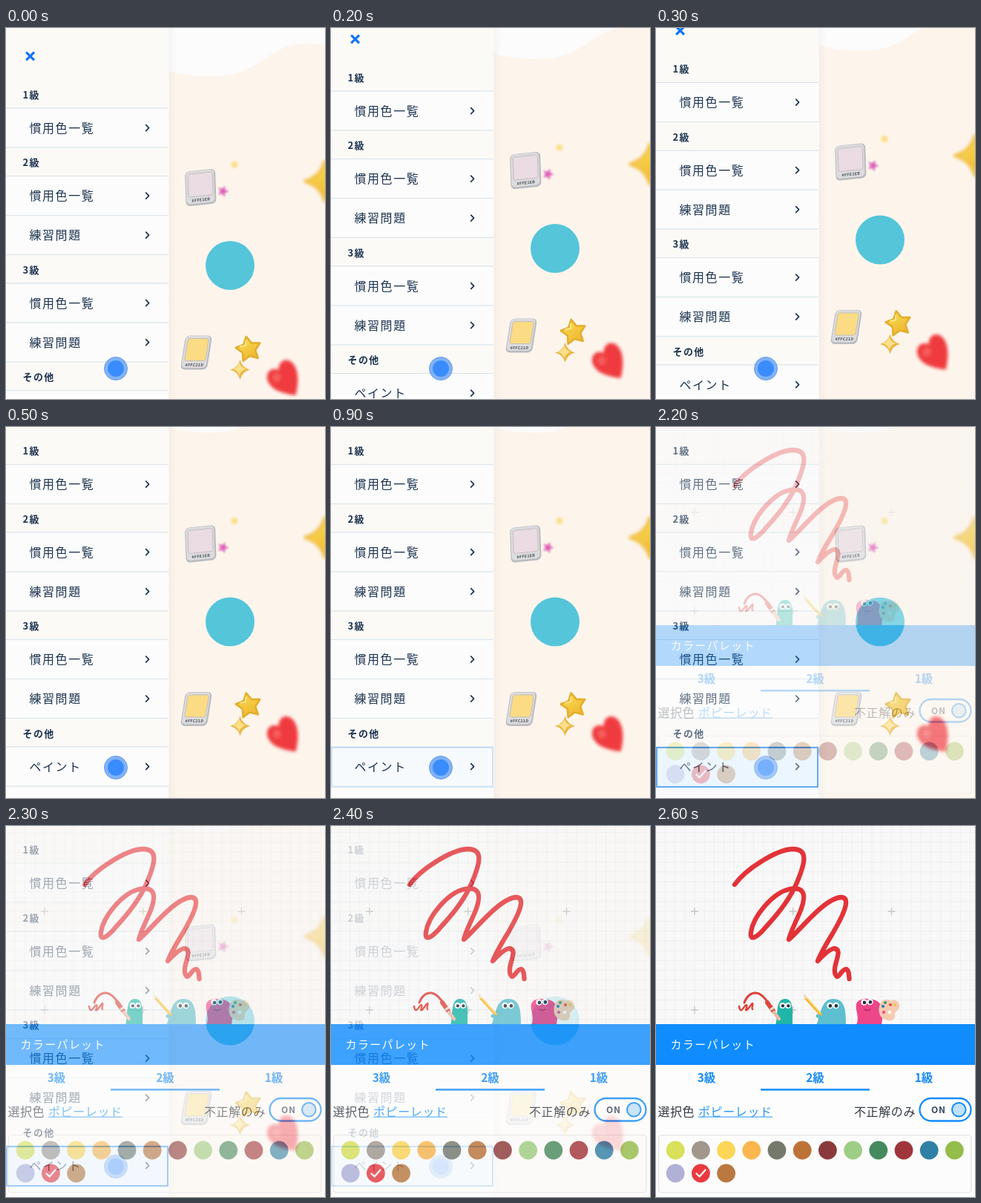
Animation of 430 by 500 pixels, one loop 5600 ms. Source, as an HTML page:

```html
<!DOCTYPE html>
<html lang="ja">
<head>
<meta charset="utf-8">
<title>カラーパレット</title>
<style>
html, body { margin: 0; width: 100%; height: 100%; overflow: hidden; background: #fdf5ec; }
svg { display: block; width: 430px; height: 500px; }
text { font-family: "Noto Sans CJK JP", "Noto Sans CJK", "Noto Sans", sans-serif; }
</style>
</head>
<body>
<svg id="stage" viewBox="0 0 430 500" xmlns="http://www.w3.org/2000/svg"></svg>
<script>
const LOOP = 5600, SCROLL = 57.5;
const NAVY = '#1d3450', BLUE = '#108cff', RED = '#e23338';
const stage = document.getElementById('stage');

const rect = (x, y, w, h, fill, more = '') =>
  `<rect x="${x}" y="${y}" width="${w}" height="${h}" fill="${fill}" ${more}/>`;
const circle = (x, y, r, fill, more = '') =>
  `<circle cx="${x}" cy="${y}" r="${r}" fill="${fill}" ${more}/>`;
const fillPath = (d, fill, more = '') => `<path d="${d}" fill="${fill}" ${more}/>`;
const line = (d, color, width, more = '') =>
  `<path d="${d}" fill="none" stroke="${color}" stroke-width="${width}" stroke-linecap="round" stroke-linejoin="round" ${more}/>`;
// y is the vertical middle of the glyphs
const label = (str, x, y, size, color, weight = 400, gap = 0, more = '') =>
  `<text x="${x}" y="${y + size * 0.38}" font-size="${size}" fill="${color}" font-weight="${weight}" letter-spacing="${gap}" ${more}>${str}</text>`;

const blur = n => `style="filter:blur(${n}px)"`;

function sparkle(x, y, r, fill, more = '') {
  const k = r * 0.2;
  return fillPath(`M0 ${-r}Q${k} ${-k} ${r} 0Q${k} ${k} 0 ${r}Q${-k} ${k} ${-r} 0Q${-k} ${-k} 0 ${-r}Z`,
    fill, `transform="translate(${x} ${y})" ${more}`);
}

function star(x, y, r, turn) {
  let pts = '';
  for (let i = 0; i < 10; i++) {
    const a = (turn + i * 36) * Math.PI / 180, d = i % 2 ? r * 0.53 : r;
    pts += `${x + d * Math.sin(a)},${y - d * Math.cos(a)} `;
  }
  return `<polygon points="${pts}" fill="url(#gold)" stroke="#e2ae2c" stroke-width="2.5" stroke-linejoin="round"/>`;
}

function chip(x, y, w, h, tilt, color, code) {
  const l = -w / 2, t = -h / 2;
  return `<g transform="translate(${x} ${y}) ${tilt}">` +
    rect(l, t, w, h, '#b9bbbf', 'rx="6"') +
    rect(l + 1, t + 0.5, w - 3, h - 3, '#dcdcde', 'rx="5"') +
    rect(l + 4, t + 4, w - 8, h - 16, color, 'rx="2.5" stroke="#bdb9b8" stroke-width=".8"') +
    label(code, 0, -t - 7, 5.3, '#4a4f58', 700, 0.3, 'text-anchor="middle"') + '</g>';
}

function page() {
  return fillPath('M200 52C225 60 248 65 275 65C320 65 336 49 360 34C380 22 402 17 430 23V-5H200Z', '#fcfcfc') +
    chip(262.3, 215, 41, 47, 'skewY(-6) skewX(2)', '#eadce2', '#FFE1EB') +
    chip(256.5, 437.5, 36, 46, 'skewX(-9)', '#fbdb84', '#FFC21D') +
    circle(308, 184, 4.5, '#fae08a', blur(1.6)) +
    `<g ${blur(1.3)}>${star(292.5, 220, 6, 20).replace(/fill=.*\/>/, 'fill="#e05ab5" stroke="#e58cc8" stroke-width="2"/>')}</g>` +
    sparkle(430, 206.5, 28, 'url(#gold)', `stroke="#f2c04a" stroke-width="4" ${blur(2)}`) +
    circle(302, 320, 33, '#55c5da') +
    star(327, 433, 17.5, -11) +
    line('M323 422L323 428L316 429', '#fff0a0', 2, 'opacity=".7"') +
    sparkle(315.5, 460.5, 13.5, '#ebb644') +
    sparkle(314.5, 459.5, 9, '#fbe08a') +
    `<g ${blur(2)}><g transform="translate(375.5 472.5) rotate(-34)">` +
    fillPath('M0 27C-14 15 -22 5-21-8C-19-21-6-24 0-14C6-25 20-23 21-9C21 4 12 16 0 27Z', '#ef3b3f') +
    circle(-8, -7, 6, '#fb7a74', 'opacity=".55"') + '</g></g>';
}

function menu() {
  const sections = [
    ['1級', ['慣用色一覧']],
    ['2級', ['慣用色一覧', '練習問題']],
    ['3級', ['慣用色一覧', '練習問題']],
    ['その他', ['ペイント']]
  ];
  const head = 38.5, row = 53;
  const rule = y => rect(0, y - 0.6, 219, 1.2, '#dbe5ec');
  let y = 69.5;
  let out = rect(0, -10, 219.5, 620, '#fcfcfc') + rect(0, -10, 219.5, 118, '#fcfaf7') +
    rect(219.5, -10, 11, 620, 'url(#shade)') +
    line('M27.2 32.6L38 43.4M38 32.6L27.2 43.4', '#1273f8', 3.2, 'style="stroke-linecap:butt"');
  for (const [title, items] of sections) {
    out += rect(0, y, 219.5, head, '#fcfaf7');
    if (y > 70) out += rule(y);
    out += label(title, 22.6, y + head / 2 + 1.2, 13, NAVY, 700, 1.3);
    y += head;
    for (const item of items) {
      out += rule(y);
      if (item === 'ペイント')
        out += `<g id="pick">${rect(1, y + 1, 217, 53, '#e6f4ff', 'stroke="#1f86f0" stroke-width="2"')}</g>`;
      out += label(item, 31.5, y + row / 2 + 0.4, 16, NAVY, 400, 1.55) +
        line(`M188.7 ${y + 22.7}L192.6 ${y + 26.7}L188.7 ${y + 30.7}`, NAVY, 1.7);
      y += row;
    }
  }
  return out + `<g id="lastRule">${rule(y)}</g>`;
}

function grid() {
  const cell = 13.27;
  let d = '', marks = '';
  for (let x = 52 - 3 * cell; x < 430; x += cell) d += `M${x} 0V267`;
  for (let y = 115 - 8 * cell; y < 267; y += cell) d += `M0 ${y}H430`;
  for (const x of [52, 184.7, 317.5])
    for (const y of [115, 247.8]) marks += `M${x - 4.5} ${y}h9M${x} ${y - 4.5}v9`;
  return rect(0, 0, 430, 268, '#f8f8f8') + line(d, '#efefef', 1) + line(marks, '#c6c6c6', 1.4);
}

const eye = (x, y, r) => circle(x, y, r, '#fff') + circle(x + 0.4, y + 0.4, r * 0.55, '#22303c');

function painters() {
  const green = fillPath('M161 268C165 258 160 233 174 233C186 233 184 250 184 268Z', '#1fb5a8') +
    eye(170.5, 242, 3.9) + eye(178, 242, 3.9) +
    line('M112 243C113 249 115 250 118 245C122 239 124 240 121 248C123 250 127 241 130 239C132 240 128 244 130 247', '#dc4038', 2.4) +
    line('M119 238C122 230 128 224 135 225C143 226 147 233 153 240', '#dc4038', 3) +
    line('M150 238L158 249', '#d9483e', 6) + line('M155 247L158 245', '#f3e0d5', 3) +
    line('M159 251L166 260', '#e8b9a4', 4.5);
  const blue = fillPath('M216 268C222 258 221 233 239 233C255 233 256 249 256 268Z', '#5dbfd0') +
    eye(234.5, 242, 4.2) + eye(242.5, 242, 4.2) +
    line('M202 232L222 254', '#f2b72f', 4) + line('M203 231.5L222 252.5', '#fbdc75', 1.3) +
    line('M200 228.5L202 231', '#f0dfc0', 3) + line('M218 256L224 259', '#5dbfd0', 5);
  const pink = fillPath('M270 268C275 259 268 247 270 240C272 232 286 231 296 235C308 240 306 256 304 268Z', '#ed4689') +
    eye(280.5, 237.5, 4.2) + eye(288.5, 237, 4.2) + line('M281 247q4 3 8 0', '#a92560', 1.3) +
    fillPath('M302 240C305 233 313 233 317 236C322 232 329 237 328 244C327 250 321 249 322 255C323 262 315 264 309 261C300 258 299 247 302 240Z', '#f5cbb0') +
    [[306, 243, '#2f7fb8'], [309, 238, '#3f9c6c'], [316, 241, '#e0503f'], [322, 241, '#f2c34a'], [307, 251, '#dc4b8a']]
      .map(([x, y, c]) => circle(x, y, 2.1, c)).join('') + circle(315, 251, 2.4, '#f8f8f8');
  return green + blue + pink;
}

function palette() {
  const colors = ['#d9e05a', '#a2978d', '#fdd557', '#fbb64e', '#75796c', '#bd7338', '#8a3a3b', '#9ecd85',
    '#458a5e', '#a0353c', '#2f80a5', '#94bd4c', '#b1b0d7', '#e93a40', '#ba793f'];
  const dots = colors.map((c, i) =>
    circle(26.2 + (i % 12) * 34.2, i < 12 ? 437 : 468, 12.4, c)).join('');
  const mid = 'text-anchor="middle"';
  return rect(0, 321, 430, 180, '#fdfdfd') + rect(0, 267, 430, 55, BLUE) +
    label('カラーパレット', 19.5, 294.5, 15, '#fff', 500, 1.4) +
    [['3級', 68], ['2級', 214.5], ['1級', 361]].map(([s, x]) => label(s, x, 339, 15.5, '#168af5', 700, 0, mid)).join('') +
    rect(141, 354, 147, 2.6, '#1e91fa') +
    label('選択色', 2.5, 384.5, 16, '#333a42', 400, 0.5) +
    label('ポピーレッド', 57, 384.5, 16, '#2797fa', 400, 0.6) + rect(57, 391.5, 100, 1.2, '#4ba9fb') +
    label('不正解のみ', 267, 384.5, 16, '#333a42', 400, 0.6) +
    rect(355.5, 367, 69, 30.5, '#fff', `rx="15.2" stroke="${BLUE}" stroke-width="2.3"`) +
    label('ON', 381, 382.5, 12, '#34475e', 700, 0.8, mid) +
    circle(408.3, 382.3, 9.3, '#bfe1fc', `stroke="${BLUE}" stroke-width="2"`) +
    rect(3.5, 416.5, 421.5, 77.5, '#fcfcfc', 'rx="4" stroke="#e2e2e2" stroke-width="1.2"') +
    dots + line('M54.5 468.5L58.7 472.5L66.5 463.5', '#fff', 2.2);
}

const scribble = 'M106 79C121 58 162 32 184 31C206 31 201 50 190 76C180 100 163 120 149 135' +
  'C136 151 126 156 128 143C131 122 157 90 180 85C201 81 202 94 196 111C191 125 182 140 179 153' +
  'C195 140 227 97 250 96C265 97 249 126 238 145C230 158 222 172 218 182C224 175 234 166 240 165' +
  'C248 166 246 172 243 183C240 193 240 200 244 203C248 203 251 192 257 193C260 195 260 200 260.5 206';

stage.innerHTML = `<defs>
  <linearGradient id="shade"><stop stop-color="#5a5a5a" stop-opacity=".05"/><stop offset="1" stop-color="#5a5a5a" stop-opacity="0"/></linearGradient>
  <linearGradient id="gold" x2=".6" y2="1"><stop stop-color="#fbe25a"/><stop offset="1" stop-color="#efb52f"/></linearGradient>
  </defs>` +
  rect(0, 0, 430, 500, '#fdf5ec') +
  `<g id="scroll">${page()}${menu()}</g>` +
  circle(148, 459, 15.5, '#4a90f0', 'fill-opacity=".68" stroke="#5f9df0" stroke-width="1"') +
  circle(148, 459, 11, '#3a8cfd') +
  `<g id="paint">${grid()}${line(scribble, RED, 6.3)}${painters()}${palette()}</g>`;

const [scroller, pick, lastRule, paint] = ['scroll', 'pick', 'lastRule', 'paint'].map(id => document.getElementById(id));

// Five steps of 100 ms; the first one lands on the start time
const steps = (t, start) => Math.min(1, Math.max(0, (Math.floor((t - start) / 100) + 1) / 5));

function draw(t) {
  scroller.setAttribute('transform', `translate(0 ${-SCROLL * steps(t, 100)})`);
  const picked = steps(t, 900);
  pick.setAttribute('opacity', picked);
  lastRule.setAttribute('opacity', 1 - picked);
  paint.setAttribute('opacity', Math.sin(steps(t, 2200) * Math.PI / 2));
}

const begin = performance.now();
function tick() {
  draw((performance.now() - begin) % LOOP);
  requestAnimationFrame(tick);
}
tick();
</script>
</body>
</html>
```
